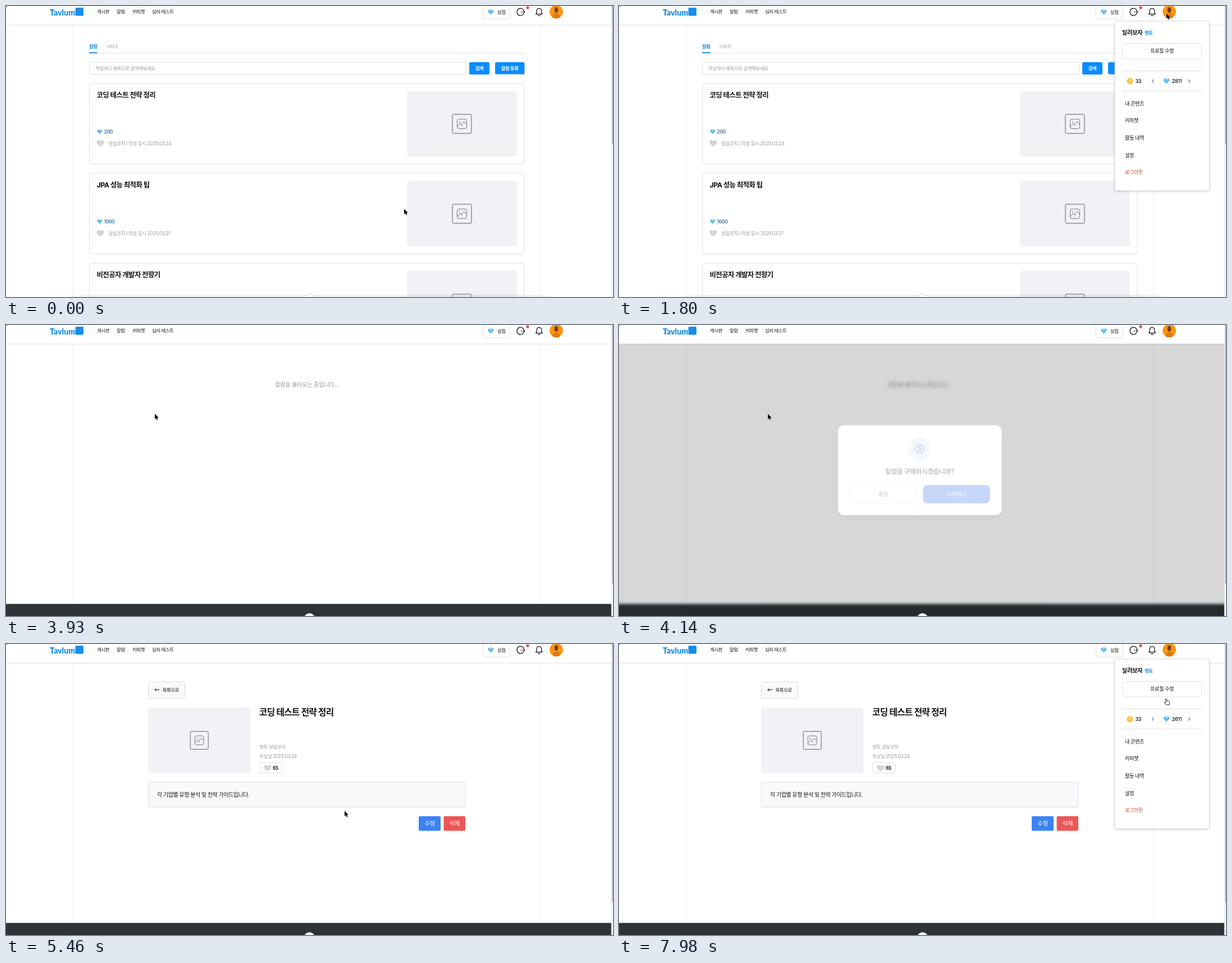
An HTML page for the animation above (8 s loop, 1081x518 px).

```html
<!DOCTYPE html>
<html lang="ko">
<head>
<meta charset="utf-8">
<style>
  html, body { margin: 0; width: 100%; height: 100%; overflow: hidden; background: #fff; }
  svg { display: block; width: 1081px; height: 518px; }
  text { font-family: Inter, "Noto Sans CJK KR", "Noto Sans CJK", sans-serif; letter-spacing: -.045em; white-space: pre; }
  .logo { font-family: Lato, sans-serif; letter-spacing: 0; }
  #header { filter: drop-shadow(0 .6px 1px #0004); }
  #box { filter: drop-shadow(0 6px 4px #0004); }
  #menu { filter: drop-shadow(0 1px 2px #0003); }
</style>
</head>
<body>
<svg id="stage" viewBox="0 0 1081 518"></svg>
<script>
const GRAY = '#9b9b9b', BLUE = '#0a8cff', LINE = '#dedfe2';

// Text is placed by its vertical centre.
const text = (x, y, s, size = 8.4, fill = '#111', weight = 400, anchor = 'start', extra = '') =>
  `<text x="${x}" y="${y + size * .37}" font-size="${size}" fill="${fill}" font-weight="${weight}" text-anchor="${anchor}" ${extra}>${s}</text>`;
const mid = (x, y, s, size, fill, weight) => text(x, y, s, size, fill, weight, 'middle');
const rect = (x, y, w, h, r = 0, fill = '#fff', stroke = 'none') =>
  `<rect x="${x}" y="${y}" width="${w}" height="${h}" rx="${r}" fill="${fill}" stroke="${stroke}"/>`;
const circle = (x, y, r, fill, extra = '') => `<circle cx="${x}" cy="${y}" r="${r}" fill="${fill}" ${extra}/>`;
const line = (d, stroke = '#111', w = 1) =>
  `<path d="${d}" fill="none" stroke="${stroke}" stroke-width="${w}" stroke-linecap="round" stroke-linejoin="round"/>`;
const at = (x, y, s, scale = 1) => `<g transform="translate(${x} ${y}) scale(${scale})">${s}</g>`;
const group = (id, s) => `<g id="${id}">${s}</g>`;

const gem = (x, y, scale = 1) => at(x, y,
  `<path d="M-5.3-1.3L-3-4.3H3L5.3-1.3 0 5Z" fill="#45aef0"/>
   <path d="M-3-4.3H3L2-1.3H-2Z" fill="#a5dcfb"/><path d="M-2-1.3H2L0 5Z" fill="#70c8f8"/>`, scale);
const heart = (x, y) => at(x, y,
  '<path d="M0 6C-4 3-6.6 1-6.6-2.2-6.6-6.2-1.5-7 0-3.6 1.5-7 6.6-6.2 6.6-2.2 6.6 1 4 3 0 6Z" fill="#d5d5d5"/>');
const thumb = (x, y, w, h, scale = 1) => rect(x, y, w, h, 5, '#f1f2f6') + at(x + w / 2, y + h / 2,
  rect(-17, -17, 34, 34, 2.5, 'none', '#5b5b5f') + rect(-8.5, -8.5, 17, 17, 3.5, 'none', '#77777b') +
  line('M-8 5L-3-1 1 4M-1 1L4-4 8 1', '#77777b') + circle(-4, -4, 1.1, '#99999d'), scale);

const card = (y, title, price, date) =>
  rect(148.5, y + .5, 774.5, 143.5, 5, '#fff', LINE) + text(161.5, y + 20.5, title, 12.4, '#111', 700) +
  gem(166.7, y + 86, .9) + text(174.5, y + 86, price, 8.6, '#3f72a3', 600) + heart(168, y + 107) +
  text(182, y + 107, `성실코치 I 작성 일시 ${date}`, 8.55, GRAY) + thumb(714, y + 13.8, 196, 117);

const button = (x, y, w, h, r, fill, label, size, weight) =>
  rect(x, y, w, h, r, fill) + mid(x + w / 2, y + h / 2, label, size, '#fff', weight);

const list =
  text(148, 72, '칼럼', 8.4, '#1583dc', 700) + text(178, 72, '시리즈', 8.4, GRAY) +
  line('M148 84.2H923', LINE) + rect(148, 82.3, 14.5, 1.8, 0, '#1583dc') +
  rect(148.5, 100.5, 671, 21, 2, '#fff', LINE) + text(159, 111, '작성자나 제목으로 검색해보세요', 8.4, GRAY) +
  button(825, 100, 36, 22, 2.5, BLUE, '검색', 8.4, 700) + button(871, 100, 52.5, 21.5, 2.5, BLUE, '칼럼 등록', 8.4, 700) +
  card(137.5, '코딩 테스트 전략 정리', '200', '2025.03.24') +
  card(297.5, 'JPA 성능 최적화 팁', '1000', '2025.03.21') +
  card(457.5, '비전공자 개발자 전향기', '500', '2025.03.18');

const detail =
  rect(253.5, 67.5, 65, 29.5, 4, '#f8f9fb', '#d9dce1') + line('M273 81.5H265M267.5 79L265 81.5 267.5 84') +
  text(278.5, 82, '목록으로', 8.4, '#111', 500) + thumb(253, 113, 182.5, 117, .94) +
  text(451, 121.5, '코딩 테스트 전략 정리', 15.7, '#111', 700) +
  text(451, 182.5, '멘토 성실코치', 8.5, GRAY) + text(451, 199.5, '작성일 2025.03.24', 8.5, GRAY) +
  rect(451.5, 211.5, 41, 18, 3, '#fff', LINE) + heart(466, 221) + text(475, 220.8, '65', 8.5, '#111', 600) +
  rect(253.5, 246, 564.5, 44.5, 4, '#f8f9fb', '#dcdfe4') +
  text(269, 268, '각 기업별 유형 분석 및 전략 가이드입니다.', 9.95) +
  button(735, 306.5, 39, 26, 2, '#3b82f6', '수정', 10.6) + button(779.5, 306.5, 38.5, 26, 2, '#ee5555', '삭제', 10.6);

const header = rect(-10, -20, 1088, 53.5) +
  text(78, 12, 'Tavlum', 14, '#178ee8', 900, 'start', 'class="logo"') + rect(123.5, 3, 14.5, 14.5, 2, '#178ee8') +
  [[162, '게시판'], [197, '칼럼'], [225, '커피챗'], [260, '심리 테스트']].map(([x, s]) => text(x, 10.3, s, 8.4, '#111', 500)).join('') +
  rect(849.5, -8, 48, 31, 4, '#fff', LINE) + gem(863.3, 10.5) + text(875, 10.8, '상점', 8.4, '#111', 500) +
  line('M915 16.8A6.4 6.4 0 1 1 918 16.7L914.3 17.1Z', '#111', 1.3) +
  [917.6, 920.6, 923.6].map(x => circle(x, 10.6, .9, '#111')).join('') + circle(929, 3, 2.6, '#e74646') +
  line('M943.7 14.3C945.5 12.5 945 10 945.2 8.3 945.8 3.2 953 3.2 953.6 8.3 953.8 10 953.3 12.5 955.1 14.3ZM947.5 16.5Q949.4 18.2 951.3 16.5', '#111', 1.25) +
  `<clipPath id="face">${circle(980, 10.3, 12, '#000')}</clipPath>
   <g clip-path="url(#face)">${circle(980, 10.3, 12, '#fb9412')}
   <path d="M973 24Q973 13 980 13T987 24Z" fill="#e3780c"/><ellipse cx="980" cy="7" rx="3.4" ry="5" fill="#70401f"/></g>`;

const menu = rect(883, 27, 168, 301.5, 2, '#fff', '#e2e2e2') +
  text(896, 47.5, '달려보자', 10.3, '#111', 700) + text(936, 48, '멘토', 8.4, '#2492e0', 600) +
  rect(896.5, 66.5, 141, 27.5, 6, '#fff', LINE) + mid(967, 80, '프로필 수정', 9.1, '#111', 500) +
  line('M896.5 115.5H1037.5M896.5 151.5H1037.5', LINE) +
  circle(910, 133.7, 5.7, '#f7c440') + mid(910, 133.7, 'P', 7, '#fbe093', 700) +
  text(919.5, 133.5, '33', 9.2, '#111', 500) + gem(975, 133.3, 1.05) +
  text(984.5, 133.5, '2811', 9.2, '#111', 500, 'start', 'id="gems"') +
  line('M949.5 131.3L951.8 133.6 949.5 136M1014.5 131.3L1016.8 133.6 1014.5 136') +
  ['내 콘텐츠', '커피챗', '활동 내역', '설정', '로그아웃']
    .map((s, i) => text(901, 173.5 + 30.6 * i, s, 9.1, i == 4 ? '#d8432f' : '#111')).join('');

const modal = rect(0, 33, 1078, 485, 0, '#0009') + group('box', rect(390, 178.5, 291.5, 160, 10)) +
  circle(535.5, 220, 21, '#dbe9fd') + circle(535.5, 220, 8, 'none', 'stroke="#1d66dc" stroke-width="1.7"') +
  mid(535.7, 220, '$', 11.5, '#1d66dc', 600) + mid(535.5, 260.5, '칼럼을 구매하시겠습니까?', 11.9, '#1b1f27', 700) +
  rect(411, 285.5, 119.5, 32, 7, '#fff', '#d5d8dd') + mid(471, 301.5, '취소', 10.4, '#222') +
  `<rect id="buy" x="541.5" y="285" width="119" height="32.5" rx="7"/>` +
  group('buyText', mid(601, 301.5, '구매하기', 10.4, '#fff')) + group('waitText', mid(601, 301.5, '구매 중...', 10.4, '#fff'));

const arrow = '<path d="M0 0V9.8L2.2 7.8 3.8 11.2 5.4 10.4 3.9 7.2H6.9Z" fill="#000" stroke="#fff" stroke-width=".8" paint-order="stroke"/>';
const hand = `<path d="M-1.8-4Q-1-5.3 0-4L.9-.3 2-.9 3-.3 4-.4 4.8.4Q6 1 5.6 3L4.6 6.5H-.2L-3.6 2.6Q-4.2 1.3-2.6 1.4L-.9 2.5Z" fill="#fff" stroke="#111" stroke-width=".9" stroke-linejoin="round"/>`;

const stage = document.getElementById('stage');
stage.innerHTML =
  group('page', rect(-30, -30, 1140, 600) + line('M119.5 0V518M952.5 0V518', '#efefef') +
    group('list', list) + group('loading', mid(535.5, 106, '칼럼을 불러오는 중입니다...', 10.4, GRAY)) +
    group('detail', detail) + group('footer', rect(-30, 496.5, 1140, 60, 0, '#2e3337'))) +
  group('modal', modal) + group('header', header) +
  rect(1078, 0, 4, 518, 0, '#fafafa') + line('M1078.3 0V518', '#e3e3e3', .8) +
  '<rect id="thumb" x="1079.6" y="0" width="1.4" fill="#a9a9a9"/>' +
  '<path d="M106 518Q130 514 160 514H925Q955 514 977 518Z" fill="#000" opacity=".06"/>' +
  circle(540.5, 523, 10, '#fff', 'stroke="#0002"') + '<path d="M0 0H3Q0 0 0 3Z" fill="#333"/>' +
  group('menu', menu) + group('arrow', arrow) + group('hand', hand);

const el = {};
for (const e of stage.querySelectorAll('[id]')) el[e.id] = e;
const show = (id, on) => el[id].style.display = on ? '' : 'none';
const fade = (id, o) => { show(id, o > 0); el[id].style.opacity = o; };
const ramp = (t, start, ms) => Math.min(1, Math.max(0, (t - start) / ms));

// Pointer path: time, x, y
const path = [
  [0, 709, 361], [350, 117, 230], [600, 560, 90], [810, 971, 8], [840, 971, 8], [960, 961, 16], [1140, 976, 14],
  [1320, 976, 14], [1440, 975, 13], [2670, 975, 13], [3000, 923, 30], [3220, 680, 105], [3450, 309, 160],
  [3700, 265, 158], [4140, 265, 158], [4390, 470, 262], [4620, 603, 297], [6150, 603, 297],
  [6350, 790, 140], [6540, 960, 24], [6870, 976, 13], [7740, 976, 13], [7980, 975, 102], [8000, 975, 102]];

const still = (a, b) => !a || !b || (a[1] == b[1] && a[2] == b[2]);
function slope(i, k) {
  const [a, p, b] = [path[i - 1], path[i], path[i + 1]];
  return still(a, p) || still(p, b) ? 0 : (b[k] - a[k]) / (b[0] - a[0]);
}
function pointer(t) {
  const i = Math.max(0, path.findIndex(p => p[0] > t) - 1);
  const a = path[i], b = path[i + 1], d = b[0] - a[0], u = (t - a[0]) / d, v = 1 - u;
  return [1, 2].map(k => a[k] * v * v * (1 + 2 * u) + b[k] * u * u * (3 - 2 * u) +
    d * u * v * (v * slope(i, k) - u * slope(i + 1, k)));
}

function draw(t) {
  const inList = t < 3870, done = t >= 5460;
  show('list', inList);
  show('loading', !inList && !done);
  show('detail', done);
  show('footer', !inList);
  el.thumb.setAttribute('height', inList ? 246 : 460);

  const asking = done ? 0 : ramp(t, 4110, 120), paying = ramp(t, 5130, 120);
  fade('modal', asking);
  el.page.style.filter = asking ? 'blur(2.7px)' : '';
  el.buy.setAttribute('fill', paying < 1 ? `rgb(${37 + 61 * paying},${99 + 67 * paying},${235 + 3 * paying})` : '#62a6ee');
  show('buyText', !paying);
  show('waitText', paying);

  fade('menu', t < 2700 ? ramp(t, 1600, 120) : ramp(t, 7210, 120));
  el.gems.textContent = t < 5000 ? '2811' : '2611';

  const [x, y] = pointer(t), overButton = t > 7740 && y > 66;
  show('arrow', !overButton);
  show('hand', overButton);
  for (const id of ['arrow', 'hand']) el[id].setAttribute('transform', `translate(${x} ${y})`);
}

const start = performance.now();
function tick() {
  draw((performance.now() - start) % 8000);
  requestAnimationFrame(tick);
}
tick();
</script>
</body>
</html>
```
